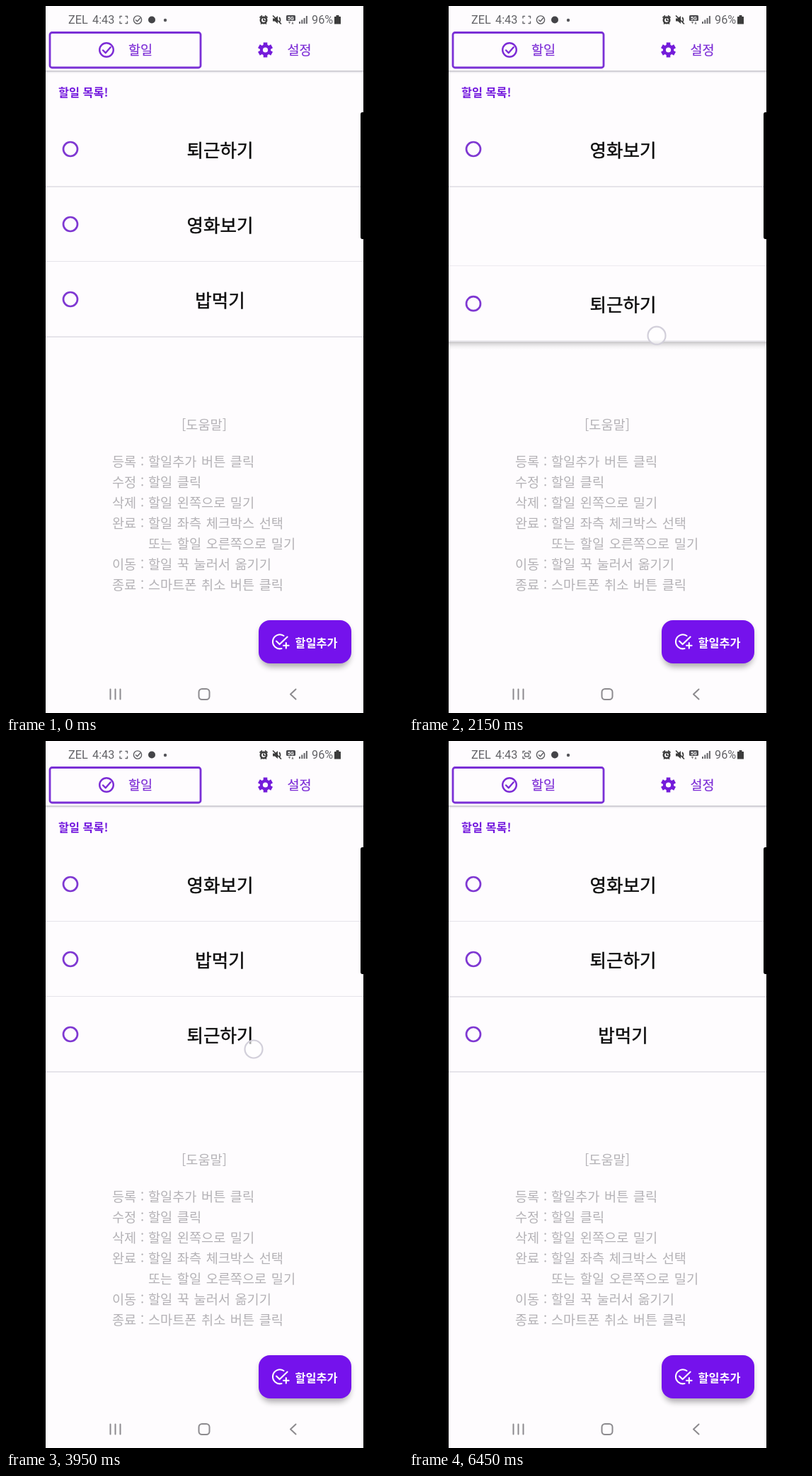
An HTML page for the animation above (6.75 s loop, 561 by 998 pixels).

```html
<!DOCTYPE html>
<html lang="ko">
<head>
<meta charset="utf-8">
<title>할일 목록</title>
<style>
  html, body { margin: 0; width: 100%; height: 100%; overflow: hidden; background: #000; }
  svg { display: block; width: 561px; height: 998px; }
  text { font-family: "Noto Sans CJK KR", "Noto Sans KR", "Noto Sans CJK", "Noto Sans", sans-serif; }
  .screen { filter: blur(.5px); }
  .status text { font-family: Roboto, sans-serif; font-size: 16.3px; fill: #626266; }
  .tab { font-size: 18.5px; fill: #7c2cd6; stroke: #7c2cd6; stroke-width: .2px; }
  .title { font-size: 16.3px; font-weight: 700; fill: #741ade; }
  .item { font-size: 25.5px; font-weight: 500; fill: #0c0c0c; stroke: #0c0c0c; stroke-width: .5px; text-anchor: middle; }
  .help text { font-size: 18.6px; fill: #b4b2b6; word-spacing: 1.4px; }
  .add { font-size: 16.3px; font-weight: 700; fill: #fff; }
  .line { fill: none; stroke-linecap: round; stroke-linejoin: round; }
</style>
</head>
<body>
<svg viewBox="0 0 561 998" xmlns="http://www.w3.org/2000/svg">
  <defs>
    <linearGradient id="shade" x1="0" y1="0" x2="0" y2="1">
      <stop offset="0" stop-color="#000" stop-opacity=".27"/>
      <stop offset=".3" stop-color="#000" stop-opacity=".13"/>
      <stop offset=".65" stop-color="#000" stop-opacity=".04"/>
      <stop offset="1" stop-color="#000" stop-opacity="0"/>
    </linearGradient>
    <filter id="soft" x="-20%" y="-30%" width="140%" height="170%"><feGaussianBlur stdDeviation="4"/></filter>
    <clipPath id="rowClip"><rect x="56" y="-53" width="449" height="106"/></clipPath>
  </defs>

  <rect width="561" height="998" fill="#000"/>
  <g class="screen">
  <rect x="56" y="-10" width="449" height="1018" fill="#fefcfe"/>

  <g class="status">
    <text x="88" y="25">ZEL</text>
    <text x="122" y="25">4:43</text>
    <path class="line" d="M161 17v-2.500h2.500M169 14.500h2.500v2.500M171.500 22v2.500h-2.500M163.500 24.500h-2.500v-2.500" stroke="#6a6a6e" stroke-width="1.400"/>
    <rect id="blink" x="163.500" y="17" width="6" height="5" rx="1.500" fill="none" stroke="#6a6a6e" stroke-width="1.500"/>
    <circle cx="186" cy="19.500" r="5.600" fill="none" stroke="#5c5c60" stroke-width="1.400"/>
    <path class="line" d="M183.500 19.800l2 2 4-4.600" stroke="#5c5c60" stroke-width="1.400"/>
    <circle cx="206" cy="19.500" r="5" fill="#444448"/>
    <circle cx="225" cy="20" r="2.200" fill="#55555a"/>
    <circle cx="364" cy="20" r="4.200" fill="none" stroke="#3c3c3c" stroke-width="2.600"/>
    <path class="line" d="M359 16l2.500-2M369 16l-2.500-2M364 18v2.500h2M360.500 25l1-1M367.500 25l-1-1" stroke="#3c3c3c" stroke-width="1.700"/>
    <path d="M377 17.500h3l4-3.500v11l-4-3.500h-3z" fill="#3c3c3c"/>
    <path class="line" d="M377.500 14l11 11M386.500 16.500q2 3 0 6" stroke="#3c3c3c" stroke-width="1.700"/>
    <rect x="396" y="13" width="13" height="8" rx="1.500" fill="#4a4a4e"/>
    <text x="402.500" y="19.600" text-anchor="middle" style="font-size:7px;font-weight:700;fill:#fff">5G</text>
    <path d="M399 22h3l-1.500 3.500zM403.500 25.500h3l-1.500-3.500z" fill="#777"/>
    <path d="M415 25v-3M418.300 25v-5.500M421.600 25v-8M424.900 25v-11" stroke="#66666a" stroke-width="2"/>
    <text x="432" y="25">96%</text>
    <path d="M464 15h2.500v-2h4v2h2.500v10.500h-9z" fill="#3c3c3c"/>
  </g>

  <rect x="56" y="91" width="449" height="2" fill="#d2d0d6"/>
  <rect x="56" y="93" width="449" height="1.500" fill="#f0eef2"/>
  <rect x="62" y="37.500" width="213" height="49.500" rx="3" fill="none" stroke="#7a30d6" stroke-width="2.800"/>
  <circle cx="142" cy="62" r="9.800" fill="none" stroke="#7c2cd6" stroke-width="2.400"/>
  <path class="line" d="M137 62.500l3.700 3.700 7-8" stroke="#7c2cd6" stroke-width="2.400"/>
  <text class="tab" x="173" y="69">할일</text>
  <g transform="translate(366.500 62)">
    <path d="M0-10.500V10.500M-9.100-5.250L9.100 5.250M-9.100 5.250L9.100-5.250" stroke="#741cda" stroke-width="5.600"/>
    <circle r="7.700" fill="#741cda"/>
    <circle r="3.600" fill="#fefcfe"/>
  </g>
  <text class="tab" x="397.500" y="69">설정</text>
  <text class="title" x="74" y="128">할일 목록!</text>

  <g class="help" id="help"><text x="280" y="598" text-anchor="middle">[도움말]</text></g>
  <g id="rows"></g>
  <circle id="touch" r="12.500" fill="#fff" fill-opacity=".65" stroke="#d2cfda" stroke-width="2.200"/>

  <rect x="359" y="872" width="127" height="61" rx="16" fill="#000" opacity=".32" filter="url(#soft)"/>
  <rect x="357" y="867" width="131" height="61" rx="16" fill="#7512ec"/>
  <g class="line" stroke="#fff" stroke-width="2.100">
    <path d="M392.500 889A10 10 0 1 0 389.500 907"/>
    <path d="M382 896.500l4.600 4.600 11-10.600"/>
    <path d="M395.800 899v7.600M392 902.800h7.600"/>
  </g>
  <text class="add" x="408.500" y="905">할일추가</text>

  <g class="line" stroke="#8c8a8e" stroke-width="2">
    <path d="M147.500 964.500v14M154.500 964.500v14M161.500 964.500v14"/>
    <rect x="272.500" y="964" width="15" height="15" rx="4.500"/>
    <path d="M409.500 964.500l-7.500 7 7.500 7"/>
  </g>
  <path d="M506 150h-2.500q-2.500 0-2.500 3v173q0 3 2.500 3h2.500z" fill="#000"/>
  </g>
</svg>

<script>
const LOOP = 6750;
const SLOT = 106, TOP = 202;
const $ = id => document.getElementById(id);

function make(tag, attrs, parent, text) {
  const el = document.createElementNS('http://www.w3.org/2000/svg', tag);
  for (const k in attrs) el.setAttribute(k, attrs[k]);
  if (text) el.textContent = text;
  parent.appendChild(el);
  return el;
}

// Help lines: label and description
[['등록', '할일추가 버튼 클릭'], ['수정', '할일 클릭'], ['삭제', '할일 왼쪽으로 밀기'],
 ['완료', '할일 좌측 체크박스 선택'], ['', '또는 할일 오른쪽으로 밀기'],
 ['이동', '할일 꾹 눌러서 옮기기'], ['종료', '스마트폰 취소 버튼 클릭']
].forEach(([label, info], i) => {
  const y = 650 + i * 29;
  if (label) {
    make('text', { x: 150, y }, $('help'), label);
    make('text', { x: 190, y }, $('help'), ':');
  }
  make('text', { x: 201, y }, $('help'), info);
});

function makeRow(label) {
  const g = make('g', {}, $('rows'));
  const lift = make('g', { opacity: 0 }, g);
  make('rect', { x: 56, y: 53, width: 449, height: 12, fill: 'url(#shade)' }, lift);
  make('rect', { x: 56, y: -54, width: 449, height: 1.5, fill: '#ebe9ee' }, lift);
  make('rect', { x: 56, y: -53, width: 449, height: 106, fill: '#fefcfe' }, g);
  make('rect', { x: 56, y: 52, width: 449, height: 2, fill: '#e6e4ea' }, g);
  const clip = make('g', { 'clip-path': 'url(#rowClip)' }, g);
  const ripple = make('circle', { r: 0, fill: '#000', opacity: 0 }, clip);
  make('circle', { cx: 91, cy: 0, r: 10, fill: 'none', stroke: '#7f38d2', 'stroke-width': 2.7 }, g);
  make('text', { class: 'item', x: 302.5, y: 10.5 }, g, label);
  return { g, lift, ripple };
}
const movie = makeRow('영화보기');
const meal = makeRow('밥먹기');
const leave = makeRow('퇴근하기');

const ramp = (t, a, b) => Math.min(1, Math.max(0, (t - a) / (b - a)));
const ease = p => (1 - Math.cos(Math.PI * p)) / 2;
const glide = (t, start) => ease(ramp(t, start, start + 250));

// Monotone cubic curve through [time, value] pairs
function curve(keys, t) {
  const n = keys.length - 1;
  if (t <= keys[0][0]) return keys[0][1];
  if (t >= keys[n][0]) return keys[n][1];
  let i = 0;
  while (t > keys[i + 1][0]) i++;
  const slope = j => (keys[j + 1][1] - keys[j][1]) / (keys[j + 1][0] - keys[j][0]);
  const tangent = j => {
    if (j === 0 || j === n) return 0;
    const a = slope(j - 1), b = slope(j);
    return a * b <= 0 ? 0 : 2 * a * b / (a + b);
  };
  const [t0, v0] = keys[i], [t1, v1] = keys[i + 1];
  const h = t1 - t0, s = (t - t0) / h, s2 = s * s, s3 = s2 * s;
  return v0 * (2 * s3 - 3 * s2 + 1) + v1 * (3 * s2 - 2 * s3)
    + h * (tangent(i) * (s3 - 2 * s2 + s) + tangent(i + 1) * (s3 - s2));
}

const drags = [
  { down: 350, hold: 950, up: 2935, to: 2 * SLOT,
    row: [[1250, 0], [1550, 54], [1950, 164], [2150, 218], [2350, 250], [2650, 270]],
    x: [[1250, 311], [1550, 320], [2150, 350], [2650, 357]],
    y: [[1250, 238], [1550, 292], [1950, 411], [2150, 465], [2350, 497], [2650, 518]] },
  { down: 3950, hold: 4450, up: 5830, to: SLOT,
    row: [[4700, 212], [4850, 174], [5000, 116.5], [5150, 88], [5400, 77]],
    x: [[4700, 350], [5000, 370], [5400, 383]],
    y: [[4700, 435], [4850, 389], [5000, 327], [5150, 300], [5400, 290]] }
];

function place(row, y) {
  row.g.setAttribute('transform', `translate(0 ${y.toFixed(2)})`);
}

function draw(t) {
  const d = t < 3700 ? drags[0] : drags[1];
  const held = curve(d.row, t);
  const y = TOP + held + (d.to - held) * glide(t, d.up);
  const x = curve(d.x, t), ty = curve(d.y, t);

  place(leave, y);
  place(movie, TOP + SLOT * (1 - glide(t, 1745)));
  place(meal, TOP + SLOT * (2 - glide(t, 2145) + glide(t, 5020)));

  // The raised shadow drops soon after release
  const raised = ramp(t, d.hold, d.hold + 120) * (1 - ramp(t, d.up, d.up + 140));
  leave.lift.setAttribute('opacity', raised);

  // Press ripple, cleared once the row is picked up
  const grow = ramp(t, d.down + 50, d.down + 300);
  leave.ripple.setAttribute('cx', x);
  leave.ripple.setAttribute('cy', ty - y);
  leave.ripple.setAttribute('r', 330 * grow);
  leave.ripple.setAttribute('opacity', 0.05 * (1 - ramp(t, d.hold, d.hold + 100)));

  const touch = $('touch');
  touch.setAttribute('cx', x);
  touch.setAttribute('cy', ty);
  touch.setAttribute('opacity', t < d.down ? 0 : 1 - ramp(t, d.up - 35, d.up + 215));

  $('blink').setAttribute('opacity', (t + 550) % 1000 < 500 ? 1 : 0);
}

const begin = performance.now();
function tick() {
  draw((performance.now() - begin) % LOOP);
  requestAnimationFrame(tick);
}
tick();
</script>
</body>
</html>
```
